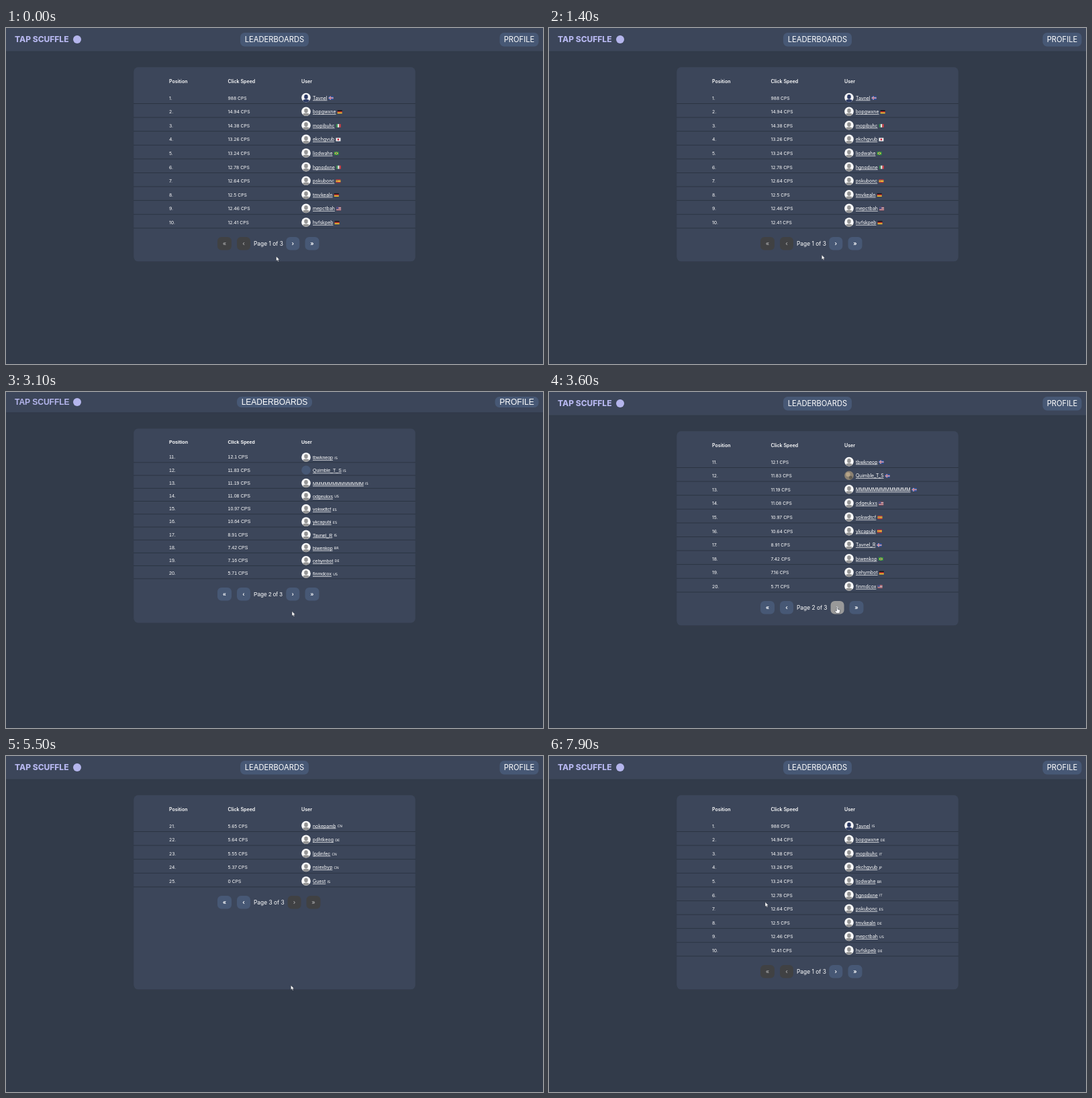
Write an HTML page that moves like this. It is 800 px wide and 500 px high and loops after 8 s.

```html
<!DOCTYPE html>
<html lang="en">
<head>
<meta charset="utf-8">
<style>
  html, body { margin: 0; width: 100%; height: 100%; overflow: hidden; background: #323b4a; }
  svg { display: block; width: 800px; height: 500px; }
  text { fill: #fff; white-space: pre; }
</style>
</head>
<body>
<svg viewBox="0 0 800 500"><g id="screen"></g><g id="pointer"></g></svg>
<script>
const LOOP = 8000;
const screenGroup = document.getElementById('screen');
const pointer = document.getElementById('pointer');
const measure = document.createElement('canvas').getContext('2d');

const players = `988 Tavnel IS|14.94 bopgwxne DE|14.38 mopibuhc IT|13.26 ekchgvub JP|13.24 liodwahe BR
12.78 hgnodxne IT|12.64 pskubonc ES|12.5 tmvkealn DE|12.46 mepctbah US|12.41 hvfskpeb DE
12.1 tbwkneop IS|11.83 Quimble_T_S IS|11.19 ${'M'.repeat(13)} IS|11.08 odgeukxs US|10.97 vokwdtcf ES
10.64 ykcapubi ES|8.91 Tavnel_R IS|7.42 biwenkop BR|7.16 cehymbot DE|5.71 finmdcox US
5.65 nokepamb CN|5.64 pdhtkeog DE|5.55 lpdinfec CN|5.37 nsiexbyp CN|0 Guest IS`
  .split(/[|\n]/).map(line => line.split(' '));

// The page first shows in the fallback face, then in the loaded one.
const fallback = { font: "'Liberation Sans', Arial, sans-serif", nav: 12, row: 7, name: 7, page: 8.4, bold: 700,
  header: 30.5, navH: 16, navW: [112, 65], card: 54.5, head: 77, first: 97.4, step: 19.22, lift: .7, line: 7.4 };
const loaded = { font: 'Inter, sans-serif', nav: 11.2, row: 6.8, name: 6.95, page: 8.4, bold: 600,
  header: 34.7, navH: 20.5, navW: [102, 58], card: 58.3, head: 81.9, first: 104, step: 20.6, lift: 0, line: 8.4 };

// [start, page, face, flags shown]
const scenes = [
  [0, 1, loaded, true], [3100, 2, fallback, false], [3200, 2, loaded, false], [3400, 2, loaded, true],
  [5300, 3, loaded, false], [5700, 3, loaded, true], [7800, 1, loaded, false]
];

// [time, x, y] of the pointer tip
const path = [
  [0, 402.5, 339.7], [1300, 402.5, 339.7], [1700, 426, 326.3], [3300, 426, 326.3], [3800, 431, 316.6],
  [4900, 431, 316.6], [5300, 424.3, 341], [5550, 424.3, 341], [6300, 322, 217.3], [LOOP, 322, 217.3]
];

const rect = (x, y, w, h, fill, r = 0) => `<rect x="${x}" y="${y}" width="${w}" height="${h}" rx="${r}" fill="${fill}"/>`;
const circle = (x, y, r, fill) => `<circle cx="${x}" cy="${y}" r="${r}" fill="${fill}"/>`;
const text = (x, y, size, str, attrs = '') => `<text x="${x}" y="${y}" font-size="${size}" ${attrs}>${str}</text>`;
const at = (x, y, content) => `<g transform="translate(${x} ${y})">${content}</g>`;
const bands = (colors, vertical) => colors.map((c, i) => {
  const n = colors.length;
  return vertical ? rect(i * 7 / n, 0, 7 / n, 5, c) : rect(0, i * 5 / n, 7, 5 / n, c);
}).join('');

const flags = {
  IS: rect(0, 0, 7, 5, '#3155a8') + rect(0, 1.8, 7, 1.4, '#eee') + rect(1.9, 0, 1.4, 5, '#eee')
    + rect(0, 2.2, 7, .6, '#cf4055') + rect(2.3, 0, .6, 5, '#cf4055'),
  DE: bands(['#151515', '#d32f27', '#f3c52f']),
  IT: bands(['#3b9155', '#eee', '#cc4148'], true),
  JP: rect(0, 0, 7, 5, '#f2f2f2') + circle(3.5, 2.5, 1.4, '#c8243b'),
  BR: rect(0, 0, 7, 5, '#2f9348') + '<path d="M.6 2.5 3.5.5l2.9 2-2.9 2z" fill="#e8d23c"/>' + circle(3.5, 2.5, 1, '#2b4a8c'),
  ES: bands(['#c8333a', '#f0bf36', '#f0bf36', '#c8333a']) + rect(1.5, 1.8, 1, 1.3, '#b5573a'),
  US: bands(['#c44a56', '#eee', '#c44a56', '#eee', '#c44a56', '#eee', '#c44a56']) + rect(0, 0, 3.2, 2.7, '#3c4a86'),
  CN: rect(0, 0, 7, 5, '#d6302c') + circle(1.6, 1.6, .8, '#f2cf3c')
};

const person = (back, fill) => circle(0, 0, 6.8, back)
  + `<ellipse cy="-1.2" rx="2.8" ry="3.3" fill="${fill}"/>`
  + `<path d="M-4.8 4.8C-4.6 1.6 4.6 1.6 4.8 4.8A6.8 6.8 0 0 1-4.8 4.8Z" fill="${fill}"/>`;

function avatar(position, face) {
  if (position === 1) return person('#f4f4f6', '#2d3b64');
  if (position !== 12) return person('#fafafa', '#959595');
  if (face === fallback) return circle(0, 0, 6.8, '#475875');
  return circle(0, 0, 6.8, '#8b8172') + circle(-1.5, -1.5, 3.2, '#b6a488') + circle(2.5, 3, 2.5, '#5f5b52');
}

function row(face, position, y, flagged) {
  const [speed, name, country] = players[position - 1];
  measure.font = `${face.name}px ${face.font}`;
  const end = 457 + measure.measureText(name).width + 2.2;
  return text(243, y + 2.6 - face.lift, face.row, position + '.')
    + text(330.5, y + 2.6 - face.lift, face.row, speed + ' CPS')
    + at(447, y - .4, avatar(position, face))
    + text(457, y + 2.5 + face.lift / 2, face.name, name, 'text-decoration="underline"')
    + (flagged ? at(end, y - 2.3, flags[country])
      : text(end, y + 2.3, 5, country, `font-family="'DejaVu Sans', sans-serif"`))
    + rect(190, y + face.line - .4, 420, .9, '#2a3340');
}

function pageButtons(page, face) {
  const count = page === 3 ? 5 : 10;
  const y = face.first + count * face.step + (face === loaded ? 1 : 1.4);
  const wide = page > 1 && face === loaded;
  return [['«', 315], ['‹', 344], ['›', wide ? 419.6 : 417.3], ['»', wide ? 447.5 : 445.5]].map(([label, x], i) => ({
    label, x, y, w: i % 3 ? 20 : 21, h: 19.6, enabled: i < 2 ? page > 1 : page < 3
  }));
}

function drawScreen(page, face, flagged, buttons, hovered) {
  const logoY = face === loaded ? 21.2 : 19.4;
  const navText = 7 + face.navH / 2 + 4.1;
  const first = page * 10 - 9;
  const count = page === 3 ? 5 : 10;
  const nav = (label, center, w) => rect(center - w / 2, 7, w, face.navH, '#475875', 6.5)
    + text(center, navText, face.nav, label, 'text-anchor="middle"');
  let out = rect(0, 0, 800, face.header, '#3c465a') + rect(0, face.header, 800, 1, '#303948')
    + text(13, logoY, 12, 'TAP SCUFFLE', 'font-weight="800" style="fill:#b4b5ec"')
    + circle(106, logoY - 4.3, 6, '#b4b5ec')
    + nav('LEADERBOARDS', 400, face.navW[0]) + nav('PROFILE', 793.5 - face.navW[1] / 2, face.navW[1])
    + rect(190.3, face.card, 419.5, 289, '#3c465a', 6.5);
  [['Position', 243], ['Click Speed', 330.5], ['User', 440]].forEach(([label, x]) => {
    out += text(x, face.head, 7.1, label, `font-weight="${face.bold}"`);
  });
  for (let i = 0; i < count; i++) out += row(face, first + i, face.first + i * face.step, flagged);
  buttons.forEach((b, i) => {
    const fill = !b.enabled ? '#404143' : i === hovered ? '#999' : '#475875';
    out += rect(b.x, b.y, b.w, b.h, fill, 6)
      + text(b.x + b.w / 2, b.y + 12.7, 8.6, b.label,
        `text-anchor="middle" font-weight="${face.bold}" opacity="${b.enabled ? 1 : .5}"`);
  });
  out += text(369, buttons[0].y + 12.9, face.page, `Page ${page} of 3`);
  screenGroup.setAttribute('font-family', face.font);
  screenGroup.innerHTML = out;
}

const shape = d => `<path d="${d}" fill="#fff" stroke="#252b36" stroke-width=".5" stroke-linejoin="round"/>`;
const arrow = shape('M0 0V7L1.6 5.6 2.7 8 3.9 7.5 2.9 5.2H5Z');
const hand = shape('M-.9.7Q0-.6.9.7V3.2L4 3.9Q4.7 4.3 4.4 6L3.6 9.2H-1.2L-3.7 5.8Q-3 4.6-.9 6Z');

function pointerAt(t) {
  const i = path.findIndex(key => key[0] > t);
  const [t0, x0, y0] = path[i - 1], [t1, x1, y1] = path[i];
  const u = (t - t0) / (t1 - t0), e = u * u * (3 - 2 * u);
  return [x0 + (x1 - x0) * e, y0 + (y1 - y0) * e];
}

let lastKey;
function frame(now) {
  const t = now % LOOP;
  const scene = scenes.findLastIndex(s => s[0] <= t);
  const [, page, face, flagged] = scenes[scene];
  const buttons = pageButtons(page, face);
  const [x, y] = pointerAt(t);
  const hovered = buttons.findIndex(b => b.enabled && x > b.x && x < b.x + b.w && y > b.y && y < b.y + b.h);
  const key = scene + ':' + hovered;
  if (key !== lastKey) {
    drawScreen(page, face, flagged, buttons, hovered);
    pointer.innerHTML = hovered < 0 ? arrow : hand;
    lastKey = key;
  }
  pointer.setAttribute('transform', `translate(${x} ${y})`);
  requestAnimationFrame(frame);
}
frame(performance.now());
</script>
</body>
</html>
```
